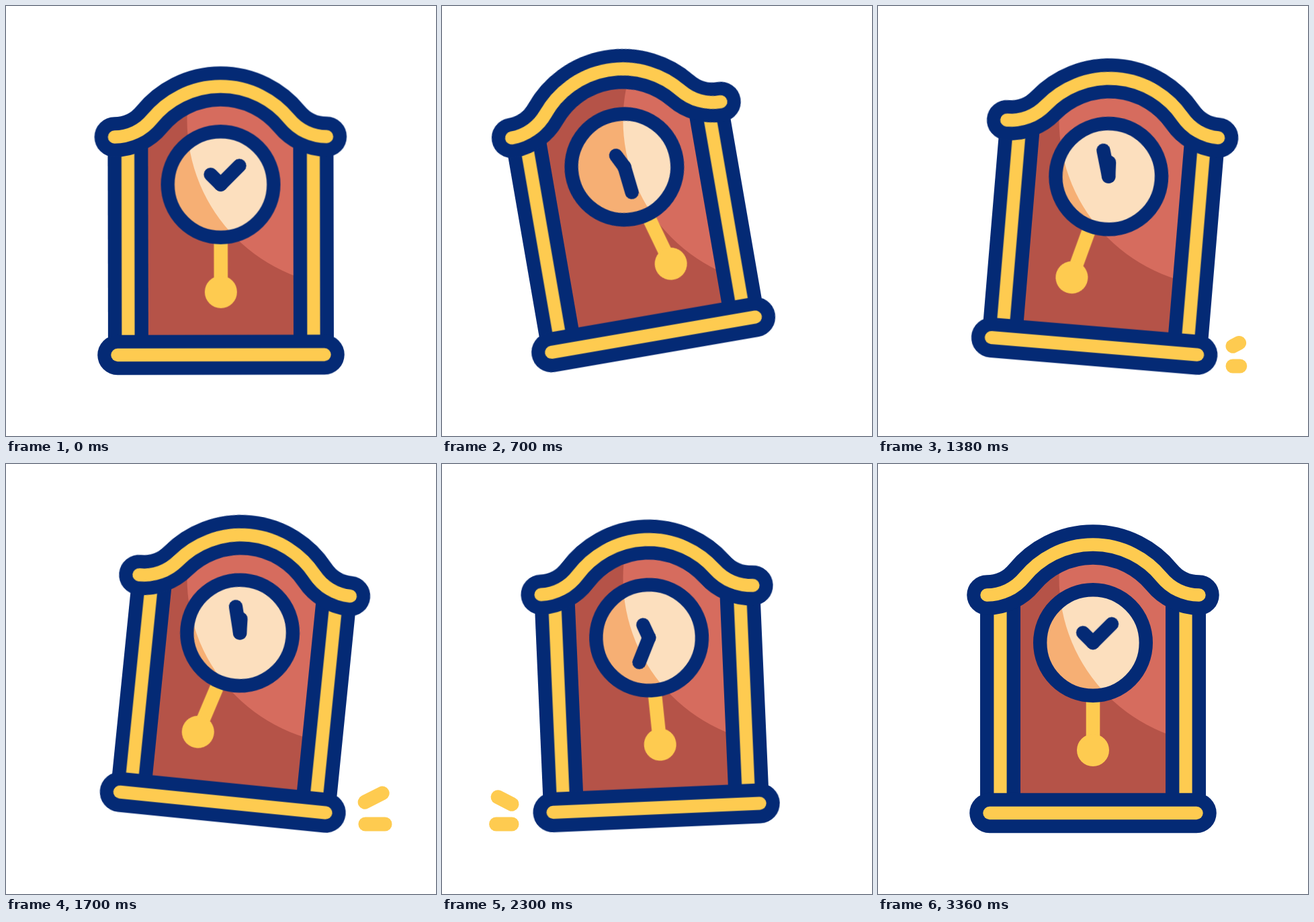
Animation of 640x640 px, one loop 3600 ms. Source, as an HTML page:

```html
<!DOCTYPE html>
<html lang="en">
<head>
<meta charset="utf-8">
<title>Mantel clock</title>
<style>
  :root {
    --navy: #042a75;
    --gold: #fecb50;
    --loop: 3600ms linear infinite;
  }
  html, body { margin: 0; width: 100%; height: 100%; overflow: hidden; background: #fff; }
  svg { display: block; width: 100%; height: 100%; }

  .navy { fill: var(--navy); }
  .gold { fill: var(--gold); }
  .line { fill: none; stroke-linecap: round; stroke-linejoin: round; }
  .edge { stroke: var(--navy); stroke-width: 59.5; }
  .core { stroke: var(--gold); stroke-width: 19.4; }

  /* The clock rocks on one foot, then on the other. */
  .left { transform-origin: 141px 535.5px; animation: rock-left var(--loop); }
  .right { transform-origin: 479px 538px; animation: rock-right var(--loop); }
  @keyframes rock-left {
    0% { transform: rotate(0deg); animation-timing-function: cubic-bezier(.08, .5, .48, 1); }
    16.667% { transform: rotate(-10deg); animation-timing-function: cubic-bezier(.52, 0, .92, .5); }
    33.333% { transform: rotate(0deg); }
    55.556% { transform: rotate(0deg); animation-timing-function: cubic-bezier(.08, .5, .48, 1); }
    61.111% { transform: rotate(-3deg); animation-timing-function: cubic-bezier(.52, 0, .92, .5); }
    66.667%, 100% { transform: rotate(0deg); }
  }
  @keyframes rock-right {
    0% { transform: rotate(0deg); }
    33.333% { transform: rotate(0deg); animation-timing-function: cubic-bezier(.08, .5, .48, 1); }
    44.444% { transform: rotate(6deg); animation-timing-function: cubic-bezier(.52, 0, .92, .5); }
    55.556%, 100% { transform: rotate(0deg); }
  }

  .swing, .hand { transform-origin: 320px 266px; }
  .swing { animation: swing var(--loop); }
  @keyframes swing {
    0% { transform: rotate(0deg); animation-timing-function: cubic-bezier(.33, .08, .67, 1); }
    12.778% { transform: rotate(-17.2deg); animation-timing-function: cubic-bezier(.667, 0, .333, 1); }
    46.111% { transform: rotate(17.2deg); animation-timing-function: cubic-bezier(.667, 0, .333, 1); }
    79.444% { transform: rotate(-17.2deg); animation-timing-function: cubic-bezier(.33, 0, .67, .92); }
    93.333%, 100% { transform: rotate(0deg); }
  }

  .hand { stroke: var(--navy); stroke-width: 20.4; animation: wind var(--loop); }
  .hour { --from: -45deg; --to: 0deg; }
  .minute { --from: 45deg; --to: 360deg; }
  @keyframes wind {
    0% { transform: rotate(var(--from)); animation-timing-function: cubic-bezier(.333, 0, .667, 1); }
    44.444% { transform: rotate(var(--to)); animation-timing-function: cubic-bezier(.333, .21, .667, 1); }
    88.889%, 100% { transform: rotate(var(--from)); }
  }

  /* Dashes shoot out from the foot that lands. */
  .spark {
    stroke: var(--gold); stroke-width: 21; visibility: hidden;
    animation: grow var(--loop), leave var(--loop), show var(--loop);
    animation-delay: 1200ms;
  }
  .late { animation-delay: 2000ms; }
  @keyframes grow {
    0% { stroke-dasharray: 0px 100px; animation-timing-function: cubic-bezier(.333, 0, .667, 1); }
    13.889%, 100% { stroke-dasharray: 36px 100px; }
  }
  @keyframes leave {
    0% { stroke-dashoffset: 0px; }
    11.111% { stroke-dashoffset: 0px; animation-timing-function: cubic-bezier(.333, 0, .667, 1); }
    21.111%, 100% { stroke-dashoffset: -36px; }
  }
  @keyframes show {
    0%, 21.1% { visibility: visible; }
    21.12%, 100% { visibility: hidden; }
  }
</style>
</head>
<body>
<svg viewBox="0 0 640 640">
  <defs>
    <path id="roof" d="M162 195A72 72 0 0 0 217.8 168.5A132 132 0 0 1 422.2 168.5A72 72 0 0 0 478 195"/>
    <path id="panel" d="M206 505V180L217.8 168.5A132 132 0 0 1 422.2 168.5L434 180V505Z"/>
    <path id="base" d="M166 519.5H474"/>
    <circle id="face" cx="320" cy="266" r="78.8"/>
    <g id="pillar">
      <path class="navy" d="M152 200H212V515H152Z"/>
      <path class="gold" d="M172.4 200H191.6V515H172.4Z"/>
    </g>
    <clipPath id="light"><circle cx="517" cy="170" r="247.5"/></clipPath>
  </defs>

  <g class="left"><g class="right">
    <use href="#panel" fill="#b55348"/>
    <use href="#face" fill="#f6af74"/>
  </g></g>

  <!-- The light stays still while the clock moves through it. -->
  <g clip-path="url(#light)">
    <g class="left"><g class="right">
      <use href="#panel" fill="#d66c5e"/>
      <use href="#face" fill="#fcdfbe"/>
    </g></g>
  </g>

  <g class="left"><g class="right">
    <g class="swing gold">
      <path d="M309.7 342H330.3V426H309.7Z"/>
      <circle cx="320" cy="426" r="24"/>
    </g>
    <use href="#face" fill="none" stroke="#042a75" stroke-width="20.4"/>
    <path class="line hand hour" d="M320 266V245"/>
    <path class="line hand minute" d="M320 266V226.4"/>
    <use href="#pillar"/>
    <use href="#pillar" x="276"/>
    <use href="#roof" class="line edge"/>
    <use href="#roof" class="line core"/>
    <use href="#base" class="line edge"/>
    <use href="#base" class="line core"/>
  </g></g>

  <path class="line spark" d="M528 506.3l32.1 -16.3"/>
  <path class="line spark" d="M528 536h36"/>
  <path class="line spark late" d="M104 506.3l-32.1 -16.3"/>
  <path class="line spark late" d="M104 536h-36"/>
</svg>
</body>
</html>
```
